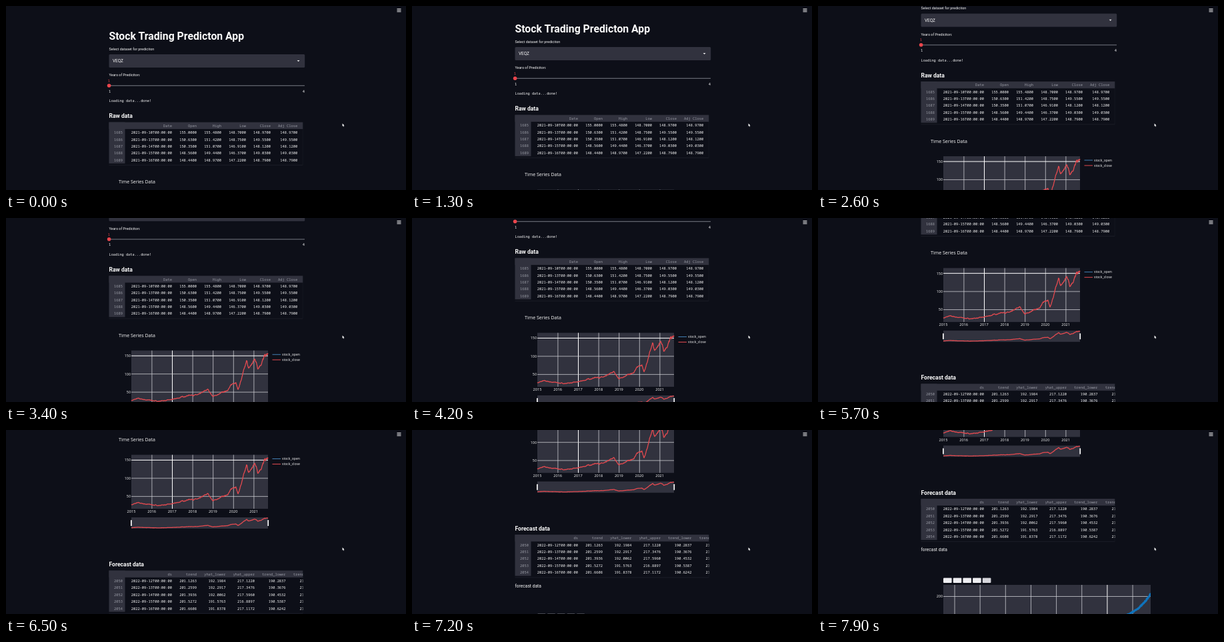
Write an HTML page that moves like this. It is 600 px wide and 278 px high and loops after 8 s.

```html
<!DOCTYPE html>
<html lang="en">
<head>
<meta charset="utf-8">
<title>Stock prediction app</title>
<style>
  html, body { margin: 0; height: 100%; overflow: hidden; background: #0d0f18; }
  svg { display: block; width: 100vw; height: 100vh; }
  text { fill: #fafafa; font-family: Roboto, sans-serif; }
  .bold { font-weight: 700; }
  .mono { font-family: "Noto Sans Mono", "DejaVu Sans Mono", monospace; font-weight: 500; }
  .plot { font-family: "Open Sans", sans-serif; font-weight: 500; }
  .dim { fill: #989aa4; }
  .red { fill: #ea454c; }
  .end { text-anchor: end; }
  .mid { text-anchor: middle; }
  .panel { fill: #31323e; }
  path { fill: none; stroke-linejoin: round; }
  .solid { fill: #fafafa; }
</style>
</head>
<body>
<svg viewBox="0 0 600 278">
  <clipPath id="tableClip"><rect x="154" y="0" width="291.5" height="900"/></clipPath>
  <clipPath id="forecastClip"><rect x="188" y="593.5" width="311" height="150"/></clipPath>
  <g id="page"></g>
  <path d="M586.5 4.4h6M586.5 6.5h6M586.5 8.6h6" stroke="#e8e8ea"/>
  <path class="solid" d="M504.6 177.4v4.4l1-.9.8 1.6.7-.4-.8-1.5h1.3z"/>
</svg>
<script>
const RED = '#e2494f', BLUE = '#0f74bd';

// y is the middle of the capitals
const text = (x, y, size, str, cls = '') =>
  `<text x="${x}" y="${y + size * 0.36}" font-size="${size}" class="${cls}">${str}</text>`;
const rect = (x, y, w, h, extra = 'class="panel"') =>
  `<rect x="${x}" y="${y}" width="${w}" height="${h}" ${extra}/>`;
const path = (d, color, width, extra = '') =>
  `<path d="${d}" stroke="${color}" stroke-width="${width}" ${extra}/>`;
const grid = (d, strong) => path(d, strong ? '#fff' : '#d4d4da', strong ? 1 : .75);
const repeat = (n, make) => Array.from({ length: n }, (_, i) => make(i)).join('');
const polyline = points => 'M' + points.map(p => p.map(n => n.toFixed(2)).join(' ')).join('L');

let seed = 7;
const random = () => (seed = seed * 16807 % 2147483647) / 2147483647;

function lerp(points, x) {
  let i = 1;
  while (i < points.length - 1 && points[i][0] < x) i++;
  const [x0, y0] = points[i - 1], [x1, y1] = points[i];
  return y0 + (y1 - y0) * (x - x0) / (x1 - x0);
}

// one row per weekday; column widths follow the longest text
function table(top, heads, firstId, firstDay, rows) {
  const cell = (x, y, str, cls = '') => text(x, y, 5.38, str, 'mono end ' + cls);
  let right = 249;
  const rights = heads.map((h, i) => right += i && Math.max(h.length, 8) * 3.235 + 11.1);
  const day = new Date(firstDay + 'T00:00:00Z');
  const nextDay = () => day.setUTCDate(day.getUTCDate() + 1);

  let out = rect(154.5, top, 291, 10.3) + rect(154.5, top, 24, 62.3) +
    path(`M154.5 ${top + 64.7}H445.3V${top}`, '#252732', 0.6);
  heads.forEach((h, i) => out += cell(rights[i], top + 5.3, h, 'dim'));
  rows.forEach((row, r) => {
    const y = top + 15.6 + r * 10.4;
    while (day.getUTCDay() % 6 == 0) nextDay();
    out += cell(175, y, firstId + r, 'dim');
    [day.toISOString().slice(0, 19), ...row].forEach((v, i) => out += cell(rights[i], y, v));
    nextDay();
  });
  return `<g clip-path="url(#tableClip)">${out}</g>`;
}

function rawTable() {
  const rows = [
    '155.0000 155.4800 148.7000 148.9700',
    '150.6300 151.4200 148.7500 149.5500',
    '150.3500 151.0700 146.9100 148.1200',
    '148.5600 149.4400 146.3700 149.0300',
    '148.4400 148.9700 147.2200 148.7900'
  ].map(row => row.split(' ')).map(row => [...row, row[3]]);
  return table(175.6, ['Date', 'Open', 'High', 'Low', 'Close', 'Adj Close'], 1685, '2021-09-10', rows);
}

function forecastTable() {
  const rows = [
    '192.1984 217.1220 190.2837',
    '192.2917 217.3476 190.3676',
    '192.0062 217.5960 190.4532',
    '191.5763 216.8897 190.5387',
    '191.8378 217.1172 190.6242'
  ].map((row, i) => {
    const trend = 201.1263 + i * .13363;
    return [trend.toFixed(4), ...row.split(' '), (trend + 10.3).toFixed(4)];
  });
  const heads = ['ds', 'trend', 'yhat_lower', 'yhat_upper', 'trend_lower', 'trend_upper'];
  return table(463.4, heads, 2050, '2022-09-12', rows);
}

// turning points of the price, by years since 2015
const turns = [[0, 27], [.3, 32], [1.3, 25], [2, 29], [2.9, 43], [3.3, 42], [3.76, 57],
  [4, 38], [4.6, 51], [5.12, 81], [5.23, 57], [5.67, 133], [5.75, 112], [6.07, 141],
  [6.2, 119], [6.53, 147], [6.7, 153]];

function prices() {
  let drift = 0;
  return Array.from({ length: 560 }, (_, i) => {
    const year = i / 559 * 6.7;
    drift = drift * .9 + (random() - .5) * .04;
    return [188 + year * 30.6, lerp(turns, year) * (1 + drift)];
  });
}

function history() {
  const yOf = v => 378.8 - v * .5487;
  const daily = prices();
  const trace = toY => path(polyline(daily.map(([x, v]) => [x, toY(v)])), RED, 1.3);
  const legend = (y, name, color) =>
    path(`M399.5 ${y}h12.5`, color, 1) + text(414, y, 5.1, name, 'plot');

  return text(169, 265.5, 7.03, 'Time Series Data', 'plot') +
    rect(188, 288.5, 205, 81.5) +
    repeat(6, i => grid(`M${218.9 + i * 30.6} 288.5v81.5`, i == 1)) +
    repeat(7, i => text(188 + i * 30.6, 374.2, 5.6, 2015 + i, 'plot mid')) +
    [50, 100, 150].map(v => grid(`M188 ${yOf(v)}h205`, v == 150) +
      text(187, yOf(v), 5.4, v, 'plot end')).join('') +
    trace(yOf) +
    legend(294.5, 'stock_open', '#4380b4') + legend(302.5, 'stock_close', RED) +
    rect(188, 383, 205, 17) + trace(v => 400 - (v - 15) * .114) +
    repeat(2, i => rect(187 + i * 205.4, 387, 1.7, 9, 'class="solid" rx=".5"'));
}

function forecast() {
  const line = Array.from({ length: 90 }, (_, i) => {
    const u = i / 89;
    return [455 + u * 44, 643 - 19 * u - 17 * u ** 3 + random() * 1.6 - .8];
  });
  return text(154.5, 540.5, 6.65, 'forecast data') +
    repeat(5, i => rect(188 + i * 14.7, 583, 12.6, 7.5,
      `fill="${i < 4 ? '#eeeef1' : '#d6d6db'}" rx="1"`)) +
    rect(188, 593.5, 311, 150) +
    repeat(8, i => grid(`M${205 + i * 38.15} 593.5v150`, i == 6)) +
    grid('M188 611h311') + text(187, 611, 5.4, 200, 'plot end') +
    path(polyline(line), BLUE, 3, 'clip-path="url(#forecastClip)"');
}

function controls() {
  return text(154.5, 45.7, 15.8, 'Stock Trading Predicton App', 'bold') +
    text(154.5, 64.7, 5.42, 'Select dataset for prediciton') +
    rect(154.5, 73, 293.7, 20, 'class="panel" rx="1.5"') +
    text(160, 83, 6.4, 'VEQZ') +
    '<path class="solid" d="M436.7 82.1h3.8l-1.9 2z"/>' +
    text(154.5, 104.3, 5.4, 'Years of Prediciton:') +
    text(154.3, 113, 5.4, '1', 'mono mid red') +
    path('M154.5 120.3H448', '#62656e', 1.2) +
    '<circle cx="154.6" cy="120.3" r="2.8" class="red"/>' +
    text(154, 128.6, 5.6, '1', 'mono') + text(448.2, 128.6, 5.6, '4', 'mono end') +
    text(154.5, 143.5, 5.3, 'Loading data...done!', 'mono');
}

const page = document.getElementById('page');
page.innerHTML = controls() +
  text(154.5, 166, 8.55, 'Raw data', 'bold') + rawTable() + history() +
  text(154.5, 454.2, 8.55, 'Forecast data', 'bold') + forecastTable() + forecast();

// page offset by time in ms, where the scrolling speed changes
const scroll = [[0, 0], [1300, 11], [1800, 18], [2600, 61.5], [4200, 115],
  [5000, 179.5], [6500, 251], [7900, 359.5]];

function draw(now) {
  const t = Math.floor(now % 8000 / 100) * 100;
  page.setAttribute('transform', `translate(0 ${-lerp(scroll, t)})`);
  requestAnimationFrame(draw);
}
draw(performance.now());
</script>
</body>
</html>
```
